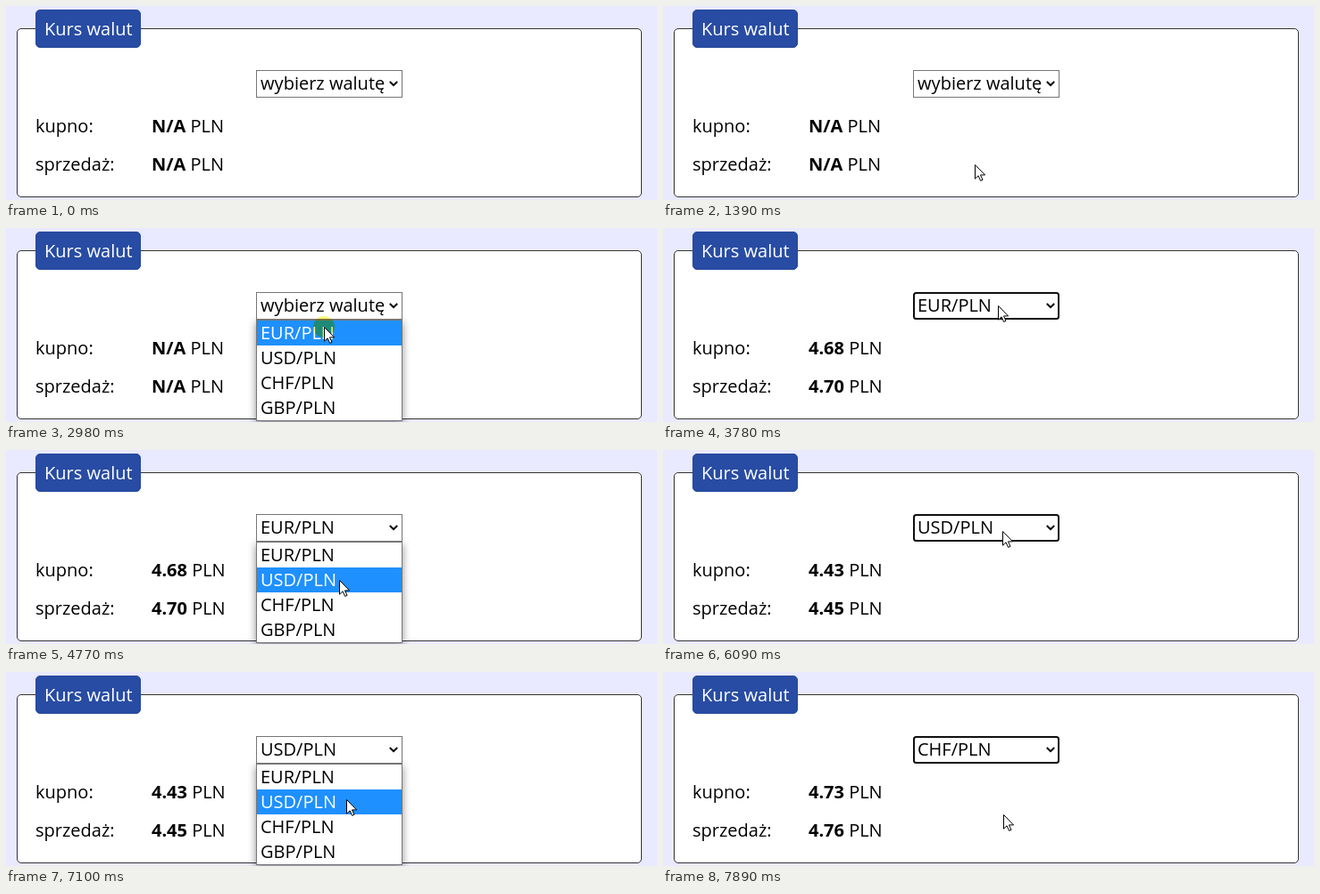
Animation, 729 px wide and 218 px high, one loop 8000 ms. Source, as an HTML page:

```html
<!DOCTYPE html>
<html lang="pl">
<head>
<meta charset="utf-8">
<title>Kurs walut</title>
<style>
  html, body { margin: 0; width: 100%; height: 100%; overflow: hidden; background: #e9e9ff; }
  svg { display: block; font: 20px "Open Sans", sans-serif; }
  text { white-space: pre; }
  .bold { font-weight: 700; }
  #panel { fill: #fff; stroke: #767676; filter: drop-shadow(0 3px 5px rgba(0, 0, 0, .45)); }
  #click { fill: #fff04a; opacity: .75; mix-blend-mode: multiply; }
</style>
</head>
<body>
<svg width="729" height="218" viewBox="0 0 729 218">
  <rect x="12.5" y="25.5" width="699" height="189" rx="4.5" fill="#fff" stroke="#333"/>
  <rect x="33.5" y="4.5" width="117" height="42" rx="4.5" fill="#284ca3" stroke="#24489c"/>
  <text x="43" y="33" fill="#fff">Kurs walut</text>
  <text x="33" y="142">kupno:</text>
  <text x="163" y="142"><tspan class="bold" id="buy"></tspan> PLN</text>
  <text x="33" y="185">sprzedaż:</text>
  <text x="163" y="185"><tspan class="bold" id="sell"></tspan> PLN</text>

  <g id="list">
    <rect id="panel" x="280.5" y="103.5" width="163" height="113"/>
    <rect id="highlight" x="281" width="162" height="28" fill="#1e90ff"/>
  </g>
  <rect id="thinBorder" x="280.5" y="72.5" width="163" height="30" fill="#fff" stroke="#767676"/>
  <rect id="focusRing" x="281" y="73" width="162" height="29" rx="2.5" fill="#fff" stroke="#101010" stroke-width="2"/>
  <text id="value" x="285" y="94"></text>
  <path d="M429.8 85l4.2 4.2l4.2-4.2" fill="none" stroke="#000" stroke-width="2"/>

  <circle id="click" r="12"/>
  <path id="cursor" d="M.5.5V16.2L4.1 12.8L6.6 18.4L9 17.4L6.5 11.9H11.6Z" fill="#fff" stroke="#000"/>
</svg>
<script>
const LOOP = 8000, ROW_TOP = 104, ROW_HEIGHT = 28;
const $ = id => document.getElementById(id);
const options = ['EUR/PLN', 'USD/PLN', 'CHF/PLN', 'GBP/PLN'];

// A rate applies from its time on; option -1 is the placeholder.
const choices = [
  { at: 0, option: -1, label: 'wybierz walutę', buy: 'N/A', sell: 'N/A' },
  { at: 3120, option: 0, label: options[0], buy: '4.68', sell: '4.70' },
  { at: 5430, option: 1, label: options[1], buy: '4.43', sell: '4.45' },
  { at: 7830, option: 2, label: options[2], buy: '4.73', sell: '4.76' }
];
const moves = [
  { start: 1390, end: 1780, steps: 6, from: [346, 216], to: [355, 90] },
  { start: 2510, end: 2580, steps: 2, from: [355, 90], to: [356, 111] },
  { start: 3450, end: 3780, steps: 6, from: [356, 111], to: [375, 87] },
  { start: 4440, end: 4770, steps: 6, from: [375, 87], to: [373, 146] },
  { start: 5830, end: 6090, steps: 5, from: [373, 146], to: [380, 91] },
  { start: 6960, end: 7290, steps: 6, from: [380, 91], to: [381, 160] }
];
const clicks = [[1980, 2180], [2980, 3120], [4110, 4240], [5300, 5430], [6620, 6760], [7760, 7890]];
const openings = [[2050, 3120], [4180, 5430], [6690, 7830]];

const during = (spans, t) => spans.some(([start, end]) => t >= start && t < end);
const show = (id, visible) => { $(id).style.display = visible ? '' : 'none'; };
const place = (id, [x, y]) => $(id).setAttribute('transform', `translate(${x} ${y})`);

const labels = options.map((name, row) => {
  const label = document.createElementNS('http://www.w3.org/2000/svg', 'text');
  label.setAttribute('x', 285);
  label.setAttribute('y', ROW_TOP + row * ROW_HEIGHT + 21);
  label.textContent = name;
  return $('list').appendChild(label);
});

function cursorAt(t) {
  const move = moves.filter(m => t >= m.start).pop();
  if (!move) return null;
  const { start, end, steps, from, to } = move;
  const step = 1 + Math.floor((t - start) / (end - start) * (steps - 1));
  const progress = Math.min(1, step / steps);
  const eased = 1 - (1 - progress) ** 2;
  return from.map((a, i) => Math.round(a + (to[i] - a) * eased));
}

function draw(t) {
  const choice = choices.filter(c => t >= c.at).pop();
  const open = during(openings, t);
  const cursor = cursorAt(t);

  $('value').textContent = choice.label;
  $('buy').textContent = choice.buy;
  $('sell').textContent = choice.sell;

  show('list', open);
  const focused = choice.option >= 0 && !open;
  show('focusRing', focused);
  show('thinBorder', !focused);

  const hovered = cursor ? Math.floor((cursor[1] - ROW_TOP) / ROW_HEIGHT) : -1;
  const active = hovered >= 0 ? hovered : choice.option;
  show('highlight', active >= 0);
  $('highlight').setAttribute('y', ROW_TOP + active * ROW_HEIGHT);
  labels.forEach((label, row) => label.setAttribute('fill', row === active ? '#fff' : '#000'));

  show('cursor', cursor);
  show('click', cursor && during(clicks, t));
  if (cursor) {
    place('cursor', cursor);
    place('click', cursor);
  }
}

const began = performance.now();
function tick() {
  draw((performance.now() - began) % LOOP);
  requestAnimationFrame(tick);
}
tick();
</script>
</body>
</html>
```
